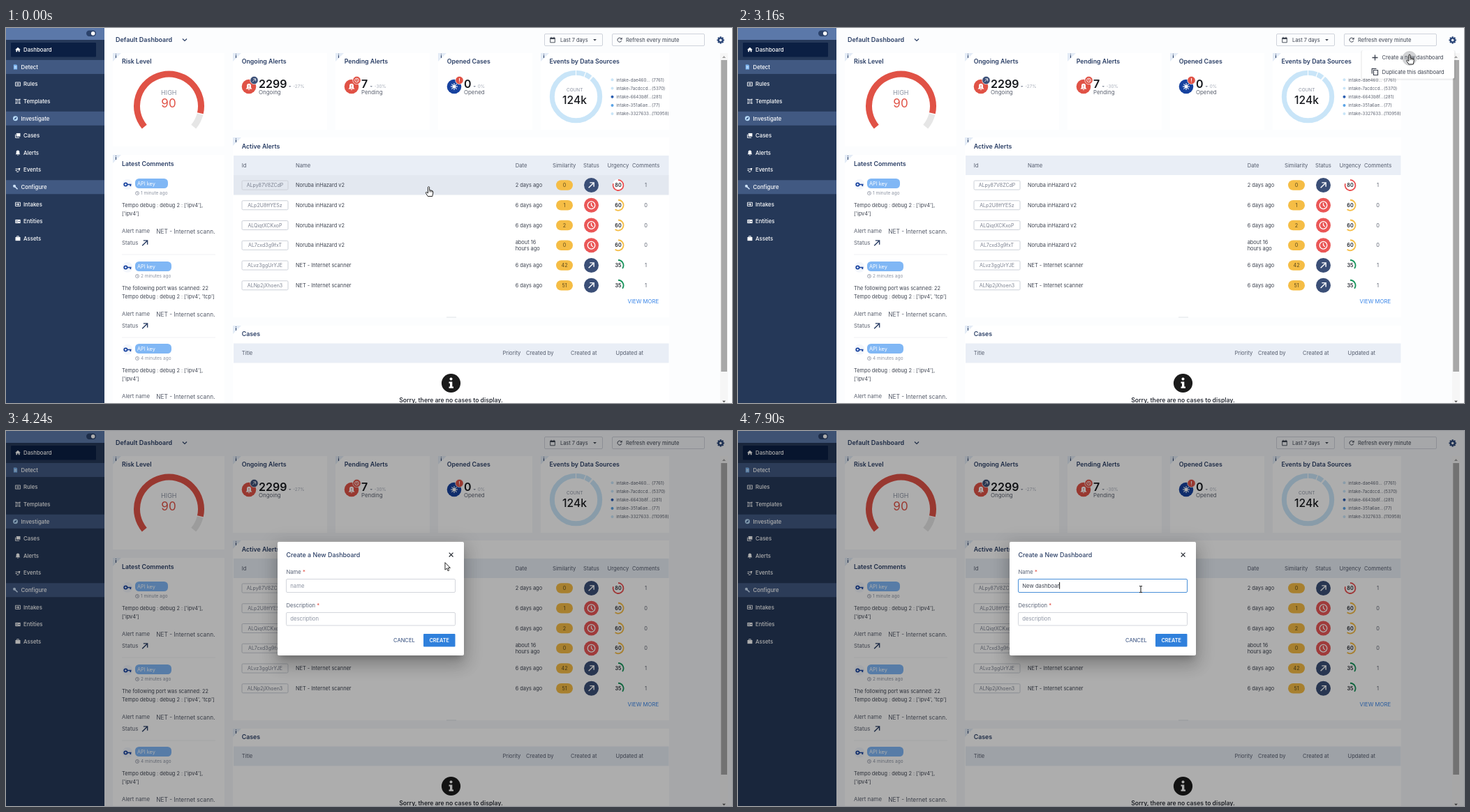
Recreate the animation shown at these times as an HTML page. Size 1040 by 538 pixels, loop 8 s.

```html
<!DOCTYPE html>
<html lang="en">
<head>
<meta charset="utf-8">
<title>Dashboard</title>
<style>
html, body { margin: 0; width: 100%; height: 100%; overflow: hidden; background: #fff; }
svg { display: block; width: 1040px; height: 538px; }
text { font-family: Inter, "Open Sans", sans-serif; white-space: pre; }
</style>
</head>
<body>
<svg id="stage" viewBox="0 0 1040 538" xmlns="http://www.w3.org/2000/svg"></svg>
<script>
const LOOP = 8000;
const NAVY = '#2b3f66', INK = '#3d4350', GREY = '#8d94a3', RED = '#e05246',
      CORAL = '#ea5757', AMBER = '#f5bd45', SLATE = '#3b4f77', BLUE = '#2f80dc';

// Shape helpers; text is centred vertically on y.
const text = (x, y, s, size = 7.4, fill = INK, extra = '') =>
  `<text x="${x}" y="${y + size * 0.36}" font-size="${size}" fill="${fill}" ${extra}>${s}</text>`;
const mid = (x, y, s, size, fill, extra = '') => text(x, y, s, size, fill, `text-anchor="middle" ${extra}`);
const semi = 'font-weight="600"', medium = 'font-weight="500"';
const title = (x, y, s) => text(x, y, s, 8.8, NAVY, semi);
const rect = (x, y, w, h, fill, extra = '') =>
  `<rect x="${x}" y="${y}" width="${w}" height="${h}" fill="${fill}" ${extra}/>`;
const frame = (x, y, w, h, stroke, extra = '') => rect(x, y, w, h, 'none', `rx="1.5" stroke="${stroke}" ${extra}`);
const dot = (x, y, r, fill, extra = '') => `<circle cx="${x}" cy="${y}" r="${r}" fill="${fill}" ${extra}/>`;
const line = (d, stroke, w = 1, extra = '') =>
  `<path d="${d}" fill="none" stroke="${stroke}" stroke-width="${w}" ${extra}/>`;
const at = (x, y, s, scale = 1) => `<g transform="translate(${x} ${y}) scale(${scale})">${s}</g>`;
const shape = (d, fill) => `<path d="${d}" fill="${fill}"/>`;
const group = (id, s) => `<g id="${id}">${s}</g>`;

// Angles in degrees, clockwise from the right.
function arc(cx, cy, r, from, to, stroke, w) {
  const p = a => `${cx + r * Math.cos(a * Math.PI / 180)} ${cy + r * Math.sin(a * Math.PI / 180)}`;
  return line(`M${p(from)}A${r} ${r} 0 ${to - from > 180 ? 1 : 0} 1 ${p(to)}`, stroke, w);
}

const upArrow = (x, y, color, scale = 1) =>
  at(x, y, line('M-3.5 3.5L3 -3M-2 -3.3H3.3V2', color, 1.3), scale);
const clock = (x, y, r, color, w) =>
  at(x, y, `<circle r="${r}" fill="none" stroke="${color}" stroke-width="${w}"/>` +
    line(`M0 ${-r * .6}V0L${r * .45} ${r * .4}`, color, w));
const bell = (x, y) => at(x, y,
  shape('M-4.5 3.5L-3 1.5V-1A3 3.2 0 0 1 3 -1V1.5L4.5 3.5ZM-1.3 4.2H1.3L0 5.4Z', '#fff') +
  line('M0 -2V.5M0 1.5V2.5', RED, .9));
const triangleDown = (x, y, w, fill) => shape(`M${x - w} ${y - w / 2}h${2 * w}l${-w} ${w}Z`, fill);

function sidebar() {
  const icons = {
    home: shape('M-4.5 0L0 -4L4.5 0H3V3.5H1V1H-1V3.5H-3V0Z', '#fff'),
    doc: shape('M-3 -4H1.5L3 -2.5V4H-3Z', '#7fb6f0') + line('M-1.5 -.5H1.5M-1.5 1.5H1.5', '#fff', .8),
    rules: line('M-4 -3H4V3H-4ZM-2 -1H2M-2 1H2', '#fff'),
    frame: line('M-3 -3H3V3H-3ZM-1.5 -1.2H1.5M0 -1.2V1.8', '#fff', .9) +
      [[-4, -4], [2.5, -4], [-4, 2.5], [2.5, 2.5]].map(([x, y]) => rect(x, y, 1.6, 1.6, '#fff')).join(''),
    compass: dot(0, 0, 4, '#b9dcfa') + shape('M2.3 -2.3L.8 .8L-2.3 2.3L-.8 -.8Z', '#2b4a7d'),
    stack: rect(-2.5, -4, 6.5, 5.5, '#fff') + line('M-4 -2V3.5H2.5', '#fff'),
    bell: shape('M-3.8 2.5L-2.7 1V-1A2.7 3 0 0 1 2.7 -1V1L3.8 2.5ZM-1 3H1V4H-1Z', '#fff'),
    events: line('M-4 1H-1M-4 -1.5H1M-2 3H1', '#fff', 1.2) + shape('M1 -3L4 -3L2 3Z', '#fff'),
    wrench: line('M-1 -1L3.5 3.5', '#cfe3fa', 1.8) + dot(-1.7, -1.7, 2.3, '#cfe3fa'),
    intake: line('M-4 -3H4V3H-4Z', '#fff') + shape('M-3 -.6H0V-2.3L2.5 0L0 2.3V.6H-3Z', '#fff'),
    card: rect(-4.2, -3, 8.4, 6, '#fff') + line('M-3 -1H0M-3 1H0', '#253858', .8) + dot(2, 0, 1, '#253858'),
    tag: rect(-4, -2.5, 8, 6, '#fff') + line('M-1.5 -2.5V-4H1.5V-2.5', '#fff')
  };
  const items = ['home Dashboard', '*doc Detect', 'rules Rules', 'frame Templates', '*compass Investigate',
    'stack Cases', 'bell Alerts', 'events Events', '*wrench Configure', 'intake Intakes', 'card Entities', 'tag Assets'];
  return rect(0, 0, 141, 538, '#253858') + rect(0, 0, 141, 17, '#5b78a9') +
    rect(115, 3.5, 14, 8.5, '#2b426b', 'rx="4.2"') + dot(124.7, 7.7, 2.8, '#fff') +
    rect(7, 21, 122, 20.5, '#0b1f43', 'rx="1"') +
    items.map((item, i) => {
      const y = 31.3 + i * 24.62, [icon, label] = item.replace('*', '').split(' ');
      const section = item[0] === '*';
      return (section ? rect(0, y - 10, 141, 20, '#415982') : '') +
        at(section ? 13.5 : 17, y, icons[icon], .87) + text(section ? 21.5 : 25, y, label, 7.8, '#fff', medium);
    }).join('');
}

function topBar() {
  const teeth = Array.from({ length: 8 }, (_, i) =>
    rect(-1.1, -5.2, 2.2, 3, '#2b4678', `transform="rotate(${i * 45})"`)).join('');
  return text(157, 17, 'Default Dashboard', 9, NAVY, semi) + line('M253 15.5L256 18.5L259 15.5', NAVY, 1.2) +
    frame(771.5, 8.5, 83, 17, '#cfd3db') + frame(868.5, 8.5, 132, 17, '#cfd3db') +
    at(783, 17, line('M-3.3 -2.8H3.3V3.8H-3.3ZM-2 -4.2V-2.5M2 -4.2V-2.5', INK, .9) + rect(-3.3, -3, 6.6, 2, INK)) +
    text(794, 17, 'Last 7 days', 7.4) + triangleDown(843.5, 17.2, 2.4, INK) +
    at(879, 17, line('M2.6 -1.4A3 3 0 1 0 2.8 1.2', INK) + shape('M3.6 -3.6V-.4H.4Z', INK)) +
    text(888, 17, 'Refresh every minute', 7.6) +
    at(1023.7, 17.4, teeth + `<circle r="2.9" fill="none" stroke="#2b4678" stroke-width="2.2"/>`);
}

function cards() {
  const boxes = [[153, 36, 160, 134], [325, 36, 135, 110], [472, 36, 135, 110], [619, 36, 135, 110],
    [766, 36, 184, 110], [153, 182, 160, 356], [325, 157, 625, 258], [325, 427, 625, 111]];
  return boxes.map(([x, y, w, h]) => rect(x, y, w, h, '#fff') +
    shape(`M${x} ${y}h12l-12 12Z`, '#e3ebf6') + mid(x + 4.5, y + 4.5, 'i', 7, NAVY, 'font-weight="700"')).join('');
}

function gauge() {
  return title(166, 47.5, 'Risk Level') + arc(233.5, 112, 46, 140, 373, RED, 9) +
    arc(233.5, 112, 46, 374.5, 400, '#e6e6e6', 9) +
    mid(233.3, 93, 'HIGH', 9, GREY) + mid(233, 108, '90', 17, RED);
}

function counter(x, label, value, heading, change, valueWidth, icon, badge) {
  return title(x, 47.5, heading) + icon + badge +
    text(x + 24.3, 80.7, value, 16, '#17191e', semi) + text(x + 24.3, 92, label, 7.9, '#5c6270') +
    triangleDown(x + 28.5 + valueWidth, 84, 1.8, GREY) + text(x + 33 + valueWidth, 84, change, 6.3, '#a9afbb');
}

function counters() {
  const spark = Array.from({ length: 4 }, (_, i) =>
    `<path d="M-5 0H5" stroke="#fff" stroke-width="1.1" transform="rotate(${i * 45})"/>`).join('');
  const badge = (x, fill) => dot(x, 75, 5.7, fill, 'stroke="#fff" stroke-width=".7"');
  return counter(337.7, 'Ongoing', '2299', 'Ongoing Alerts', '-27%', 40.5,
      dot(348, 84, 10.3, RED) + bell(348, 84), badge(355.5, SLATE) + upArrow(355.5, 75, '#fff', .65)) +
    counter(484.7, 'Pending', '7', 'Pending Alerts', '-30%', 10,
      dot(495, 84, 10.3, RED) + bell(495, 84), badge(502.5, RED) + clock(502.5, 75, 2.8, '#fff', .9)) +
    counter(631.7, 'Opened', '0', 'Opened Cases', '0%', 11,
      dot(642, 84, 10.3, '#17429f') + at(642, 84, spark + dot(0, 0, 2.3, '#fff')),
      badge(649.5, RED) + mid(649.5, 75, '!', 8, '#fff', semi));
}

function sources() {
  const gaps = [0, 22, 38, 40].map(a =>
    `<path d="M0 -30V-39" stroke="#fff" stroke-width="1.1" transform="translate(816.5 98.5) rotate(${a})"/>`).join('');
  const rows = [['dae460...', 7761], ['7acdccd...', 5370], ['6643b8f...', 281], ['351a6ae...', 77], ['3327633...', 110958]];
  const pale = '#c9e5f8', colors = [pale, pale, '#2a5db0', '#5ba4e6', pale];
  return title(778.5, 47.5, 'Events by Data Sources') +
    `<circle cx="816.5" cy="98.5" r="34.2" fill="none" stroke="${pale}" stroke-width="7"/>` + gaps +
    mid(814.7, 88.8, 'COUNT', 6.4, GREY) + mid(814.5, 103, '124k', 15.6, '#17191e', medium) +
    rows.map(([id, n], i) => {
      const y = 74.3 + i * 12.2;
      return dot(868.5, y, 2, colors[i]) + text(874.3, y, 'intake-' + id, 6.2, '#5c6270') +
        text(925, y, `(${n})`, 6.2, '#5c6270');
    }).join('');
}

function comments() {
  const debug = ["Tempo debug : debug 2 : ['ipv4'],", "['ipv4']"];
  const list = [[223, 47, '1 minute', debug],
    [342, 52, '2 minutes', ['The following port was scanned: 22', "Tempo debug : debug 2 : ['ipv4', 'tcp']"]],
    [460, 52, '4 minutes', debug]];
  return title(166, 194.5, 'Latest Comments') + list.map(([y, w, ago, lines]) =>
    dot(174, y + 1.3, 7.5, '#f3f6fb') +
    at(174, y + 1.5, `<circle cx="-2.6" r="2.2" fill="none" stroke="#17429f" stroke-width="1.7"/>` +
      line('M-.5 0H5.5M4.3 0V2.4', '#17429f', 1.7)) +
    rect(185, y - 7, w, 14, '#80b7f5', 'rx="5.5"') + text(188, y, 'API key', 7.3, '#fff') +
    clock(188, y + 14, 2.5, GREY, .8) + text(193, y + 14, ago + ' ago', 6.5, GREY) +
    lines.map((s, i) => text(166, y + 31 + i * 12.4, s, 7.35)).join('') +
    text(166, y + 68.2, 'Alert name', 7.8, '#5c6270') + text(215.3, y + 68.8, 'NET - Internet scann.', 8.35, '#555b69') +
    text(166, y + 85.2, 'Status', 7.8, '#5c6270') + upArrow(199, y + 85.5, NAVY, 1.1) +
    line(`M166 ${y + 102}H300`, '#f0f1f4')).join('');
}

function alerts() {
  const product = 'Noruba inHazard v2', scanner = 'NET - Internet scanner';
  const rows = [['ALpy87V8ZCdP', product, '2 days ago', 0, 80, 1], ['ALp2U8ffYESz', product, '6 days ago', 1, 60, 0],
    ['ALQiqtXCKxoP', product, '6 days ago', 2, 60, 0], ['AL7cxd3g9fxT', product, 'about 16|hours ago', 0, 60, 0],
    ['ALvz3ggUrYJE', scanner, '6 days ago', 42, 35, 1], ['ALNp2jXhoen3', scanner, '6 days ago', 51, 35, 1]];
  const heads = [[337.7, 'Id'], [415, 'Name'], [729.7, 'Date'], [783, 'Similarity'], [827, 'Status'], [861.5, 'Urgency'], [897, 'Comments']];
  const ring = { 80: '#ea5050', 60: AMBER, 35: '#16935a' };
  return title(337.7, 169.5, 'Active Alerts') + rect(326, 183, 623.5, 28, '#e9eef6') +
    heads.map(([x, s]) => text(x, 197, s, 7.7, '#555d6e')).join('') +
    `<rect id="hover" x="326" y="211" width="623.5" height="28.5" fill="#e3e8f0"/>` +
    rows.map(([id, name, date, similar, urgency, count], i) => {
      const y = 225.5 + i * 28.75, dates = date.split('|'), moved = urgency !== 60;
      return frame(338, y - 6.5, 66, 13, '#ccd0d8') + mid(371, y, id, 7.05, '#7b8190') +
        text(415, y, name, 7.4) +
        dates.map((s, k) => text(729.7, y + (k - (dates.length - 1) / 2) * 9, s)).join('') +
        rect(788, y - 7.3, 24, 14.6, AMBER, 'rx="7.3"') + mid(800, y, similar, 7.2, '#5c4a1d') +
        dot(838.5, y, 10.5, moved ? SLATE : CORAL) +
        (moved ? upArrow(838.5, y, '#fff', 1.1) : clock(838.5, y, 5.3, '#fff', 1.3)) +
        dot(877, y, 8.5, '#fff') + arc(877, y, 7.5, -90, -90 + 3.6 * urgency, ring[urgency], 1.8) +
        mid(877, y, urgency, 7.2, '#22262e', semi) + mid(916.5, y, count, 7.4, '#5c6270');
    }).join('') + text(890.5, 392.3, 'VIEW MORE', 7.8, '#3a86e8') + rect(631, 414.5, 14, 1, '#e0e3e8');
}

function cases() {
  const heads = [[337.7, 'Title'], [711.5, 'Priority'], [745, 'Created by'], [809, 'Created at'], [873.5, 'Updated at']];
  return title(337.7, 439, 'Cases') + rect(326, 452.5, 623.5, 28, '#e9eef6') +
    heads.map(([x, s]) => text(x, 466.5, s, 7.6, '#555d6e')).join('') +
    dot(637.5, 509.5, 13.6, '#1b1b1b') + dot(637.5, 503.5, 2, '#fff') +
    shape('M634.5 507.5H639.3V514.5H641V516.7H634.5V514.5H636V509.7H634.5Z', '#fff') +
    mid(637.5, 534, 'Sorry, there are no cases to display.', 8.6, '#2b2f38', semi);
}

const scrollbar = rect(1023, 36, 11, 502, '#f6f6f6') + rect(1024.3, 46, 8.7, 447, '#a8a8a8') +
  shape('M1026 43L1028.5 40L1031 43Z', '#a0a0a0') + triangleDown(1028.5, 536, 2.4, '#505050');

const menu = rect(892, 32, 136, 43, '#000', 'rx="3" opacity=".05"') + rect(894, 32, 132, 40.5, '#fff', 'rx="2"') +
  line('M908.5 42.5H916.5M912.5 38.5V46.5', INK, 1.3) + text(922.5, 42.5, 'Create a new dashboard', 7.6) +
  at(912.5, 63, line('M-2 -2.5H4V4.5H-2ZM-4.3 2.5V-4.7H2', INK, 1.2)) + text(922.5, 63, 'Duplicate this dashboard', 7.6);

// Three stacked shadows: drop, spread, blur, strength.
const shadow = [[6.5, -4, 4.5, .2], [14, 2, 11, .14], [5.5, 5, 13, .12]].map(([drop, spread, blur, opacity]) =>
  rect(389 - spread, 159 + drop - spread, 267 + 2 * spread, 163 + 2 * spread, '#000',
    `opacity="${opacity}" style="filter:blur(${blur}px)"`)).join('');
const label = (y, s) => text(401.5, y, `${s} <tspan fill="#e0483e">*</tspan>`, 7.7, '#5b6578');
const dialog = shadow + rect(389, 159, 267, 163, '#fff', 'rx="2"') +
  text(401.5, 177.7, 'Create a New Dashboard', 8.9, NAVY, medium) +
  line('M634.7 174.7L640.5 180.5M640.5 174.7L634.7 180.5', '#22262e', 1.1) +
  label(202.5, 'Name') + frame(401.5, 212.5, 242, 19, '#d3d6dc', 'id="field"') +
  text(407.3, 222, '', 7.7, INK, 'id="value"') + `<path id="caret" d="M0 217V226.5" stroke="#111" stroke-width="1"/>` +
  label(250, 'Description') + frame(401.5, 260.5, 242, 18.5, '#d3d6dc') + text(407.3, 269.5, 'description', 7.7, GREY) +
  text(555, 300.5, 'CANCEL', 7.6, '#2b4678') + rect(598, 291, 45.5, 18.5, BLUE, 'rx="1"') +
  mid(620.7, 300.5, 'CREATE', 7.3, '#fff', semi);

const outline = 'stroke="#111" stroke-width=".9" stroke-linejoin="round"';
const pointers = {
  arrow: `<path d="M0 2V12.5L2.5 10.3L4.1 14L5.8 13.2L4.2 9.7H7.4Z" fill="#fff" ${outline}/>`,
  hand: `<path d="M-1.1 .8Q0 -.7 1.1 .8V5L4.5 5.8Q6.6 6.2 6.4 8.5L5.3 14H-1.2L-4.2 9.2Q-4.2 7.6 -2.7 8.2L-1.1 9.5Z" fill="#fff" ${outline}/>` +
    line('M1.2 5.2V8M3 5.7V8M4.8 6.2V8.3', '#111', .7),
  beam: line('M-2 -4.5H-.6L0 -4L.6 -4.5H2M0 -4V4M-2 4.5H-.6L0 4L.6 4.5H2', '#111', 1)
};

document.getElementById('stage').innerHTML =
  `<rect id="page" width="1040" height="538"/>` + cards() + gauge() + counters() + sources() + comments() +
  alerts() + cases() + scrollbar + topBar() + sidebar() +
  group('opening', rect(951, 36, 51, 57, '#f5f9fd')) + group('menu', menu) +
  `<rect id="dim" width="1040" height="538" fill="#000"/>` + group('dialog', dialog) +
  dot(0, 0, 1, '#5c6068', 'id="ripple" stroke="#33363c" stroke-width=".8"') +
  group('pointer', Object.entries(pointers).map(([id, s]) => group(id, s)).join(''));

const $ = id => document.getElementById(id);
const set = (id, attrs) => Object.entries(attrs).forEach(([k, v]) => $(id).setAttribute(k, v));
const show = (id, on) => set(id, { visibility: on ? 'visible' : 'hidden' });

// Pointer legs: start time, end time, number of jumps, destination.
const legs = [[560, 1510, 8, 1022, 18], [2370, 2880, 5, 962, 38], [3580, 4120, 5, 635, 182], [4240, 4790, 5, 577, 227]];
function pointerAt(t) {
  let x = 605.5, y = 227.5;
  for (const [from, to, jumps, nx, ny] of legs) {
    if (t < from) break;
    const k = Math.min(1, (Math.floor((t - from) * (jumps - 1) / (to - from)) + 1) / jumps);
    const e = k * k * (3 - 2 * k);
    x += (nx - x) * e;
    y += (ny - y) * e;
  }
  return [x, y];
}

const keys = [[5450, 1], [5820, 2], [6250, 3], [6680, 4], [6800, 5], [7110, 6], [7240, 7], [7370, 8], [7500, 9], [7630, 11], [7900, 12]];
const typedAt = t => 'New dashboard'.slice(0, keys.reduce((n, [time, count]) => t >= time ? count : n, 0));

function render(t) {
  const [x, y] = pointerAt(t), open = t >= 3280;
  set('page', { fill: open ? '#f4f6f9' : '#fcfdfe' });
  show('hover', y > 211 && t < 1510);
  show('opening', t >= 1770 && t < 1920);
  show('menu', t >= 1920 && !open);
  set('dim', { opacity: !open ? 0 : t < 3430 ? .17 : t < 3580 ? .29 : .32 });

  show('dialog', open);
  const growing = t < 3430;
  set('dialog', {
    opacity: growing ? .82 : 1,
    transform: growing ? 'translate(522.5 240.5) scale(.94) translate(-522.5 -240.5)' : ''
  });
  const focused = t >= 4790, typed = typedAt(t);
  set('field', { stroke: focused ? '#4a90d9' : '#d3d6dc' });
  $('value').textContent = typed || 'name';
  set('value', { fill: typed ? INK : GREY });
  const caretX = 407.5 + (typed ? $('value').getComputedTextLength() + .3 : 0);
  set('caret', { transform: `translate(${caretX} 0)`, opacity: open && t >= 5070 ? 1 : 0 });

  const gearClick = t >= 1630 && t < 1920, itemClick = t >= 3160 && !open;
  show('ripple', gearClick || itemClick);
  set('ripple', gearClick ? { cx: 1023, cy: 20, r: t < 1770 ? 5 : 6.5, opacity: .5 }
                          : { cx: 962, cy: 43.5, r: 10, opacity: .28 });

  const inField = t > 4240 && y > 212;
  const overLink = t < 3280 && (y > 211 || (t >= 1510 && t < 2370) || t >= 2630);
  const kind = inField ? 'beam' : overLink ? 'hand' : 'arrow';
  for (const id in pointers) set(id, { display: id === kind ? 'inline' : 'none' });
  set('pointer', { transform: `translate(${x} ${y})` });
}

function tick() {
  render(performance.now() % LOOP);
  requestAnimationFrame(tick);
}
tick();
</script>
</body>
</html>
```
